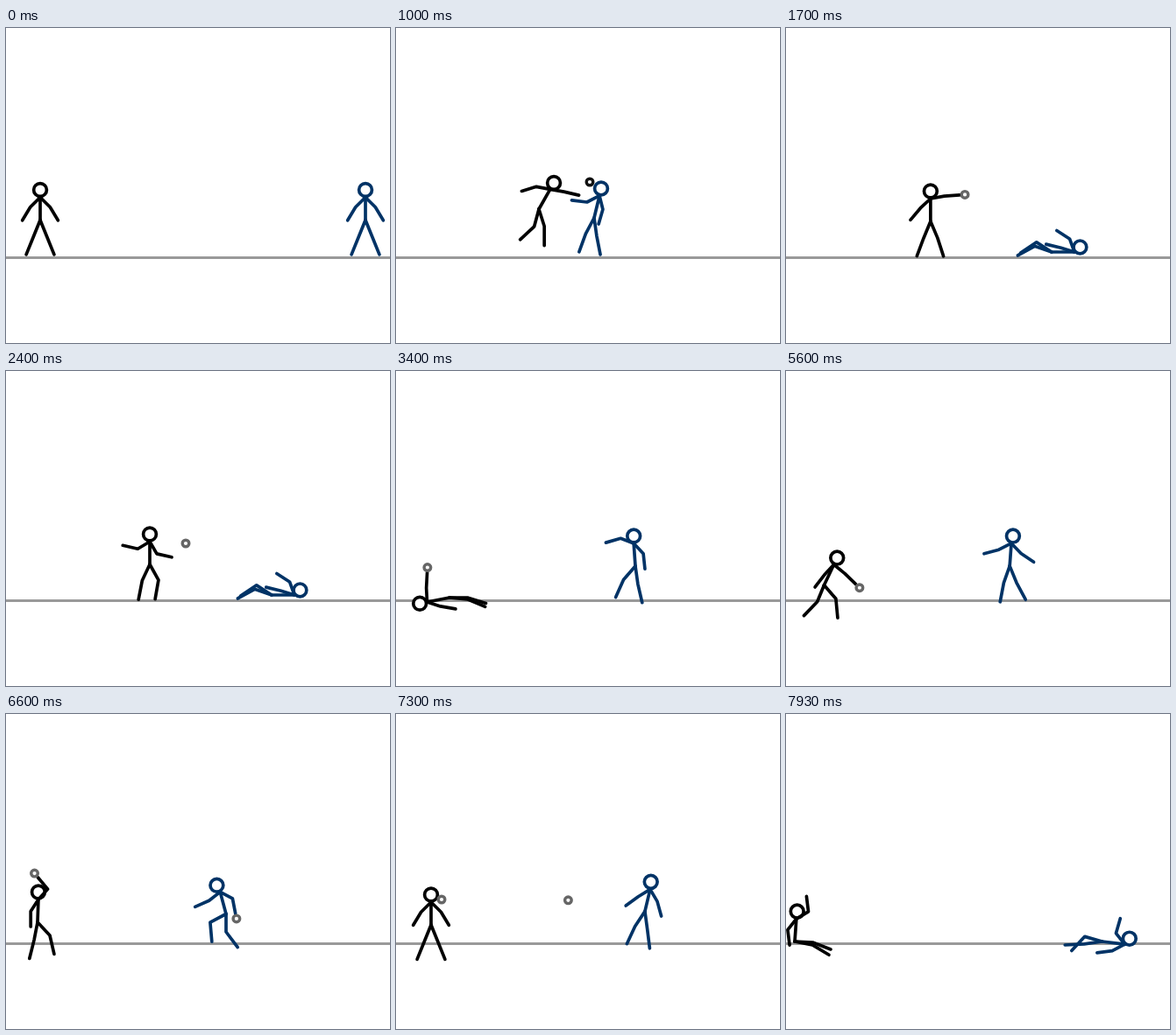
Recreate the animation shown at these times as an HTML page with a canvas. Size 438 by 360 pixels, loop 8 s.

```html
<!DOCTYPE html>
<html lang="en">
<head>
<meta charset="utf-8">
<title>Stick figure ball fight</title>
<style>
html, body { margin: 0; width: 100%; height: 100%; overflow: hidden; background: #fff; }
canvas { display: block; }
</style>
</head>
<body>
<canvas id="stage" width="438" height="360"></canvas>
<script>
const ctx = document.getElementById('stage').getContext('2d');
const LOOP = 8000, LAST = 7930, STEP = 100;
const TORSO = 26, NECK = 8.5, ARM = [16, 17.5], LEG = [20.5, 22], GRIP = 6;

const mix = (a, b, k) => a + (b - a) * k;
const arc = k => Math.sin(Math.PI * k);

// Neighbouring keys around t and the fraction between them
function span(keys, t) {
  let i = 0;
  while (i < keys.length - 2 && t >= keys[i + 1].t) i++;
  const a = keys[i], b = keys[i + 1];
  return [a, b, Math.min(1, Math.max(0, (t - a.t) / (b.t - a.t)))];
}

// Limb angles are in degrees: 0 points down, positive swings right.
// Torso and head lean from upright; each limb is [upper, lower].
function pose(x, y, torso, head, armA, armB, legA, legB) {
  const [a1, a2] = armA, [b1, b2] = armB, [c1, c2] = legA, [d1, d2] = legB;
  return { x, y, torso, head, a1, a2, b1, b2, c1, c2, d1, d2 };
}
const stand = (x, y) => pose(x, y, 0, 0, [-45, -31], [45, 31], [-22, -22], [22, 22]);

// Motions add offsets to a blend of two poses and vanish at both ends
const run = (strides, lean) => k => {
  const cross = (1 - Math.cos(2 * Math.PI * strides * k)) / 2;
  const s = 44 * cross, bend = Math.sign(lean) * 35 * arc(strides * k) ** 2;
  const tilt = lean * arc(k);
  return { torso: tilt, head: tilt, a1: s, a2: s + bend, b1: -s, b2: bend - s,
           c1: s, c2: s - bend, d1: -s, d2: -s - bend };
};
const hop = (height, drift = 0) => k => ({ x: drift * arc(k), y: -height * arc(k) });
const swingA = turn => k => ({ a1: turn * arc(k), a2: turn * arc(k) });
const swingB = turn => k => ({ b1: turn * arc(k), b2: turn * arc(k) });
const bow = k => ({ y: 10 * arc(k), torso: 50 * arc(k), head: 45 * arc(k),
                    c2: -45 * arc(k), d1: 35 * arc(k), d2: -25 * arc(k) });

function move([x, y], angle, length) {
  const r = angle * Math.PI / 180;
  return [x + Math.sin(r) * length, y + Math.cos(r) * length];
}

function limb(start, upper, lower, [l1, l2]) {
  const joint = move(start, upper, l1);
  return [start, joint, move(joint, lower, l2)];
}

function line(points) {
  ctx.beginPath();
  points.forEach(p => ctx.lineTo(...p));
  ctx.stroke();
}

function ring([x, y], r) {
  ctx.beginPath();
  ctx.arc(x, y, r, 0, 7);
  ctx.fill();
  ctx.stroke();
}

class Figure {
  constructor(color) { this.color = color; this.keys = []; }

  // The optional motion acts from this key to the next
  key(t, pose, motion = () => ({})) { this.keys.push({ t, pose, motion }); return this; }

  joints(t) {
    const [a, b, k] = span(this.keys, t);
    const offset = a.motion(k), p = {};
    for (const n in a.pose) p[n] = mix(a.pose[n], b.pose[n], k) + (offset[n] || 0);
    const hip = [p.x, p.y], neck = move(hip, 180 - p.torso, TORSO);
    return {
      hip, neck, head: move(neck, 180 - p.head, NECK),
      armA: limb(neck, p.a1, p.a2, ARM), armB: limb(neck, p.b1, p.b2, ARM),
      legA: limb(hip, p.c1, p.c2, LEG), legB: limb(hip, p.d1, p.d2, LEG),
      gripA: p.a2, gripB: p.b2
    };
  }

  hand(side) {
    return t => {
      const j = this.joints(t);
      return move(j['arm' + side][2], j['grip' + side], GRIP);
    };
  }

  draw(t) {
    const j = this.joints(t);
    ctx.strokeStyle = this.color;
    ctx.lineWidth = 3.7;
    ring(j.head, 7.4);
    [[j.hip, j.neck], j.armA, j.armB, j.legA, j.legB].forEach(line);
  }
}

class Ball {
  constructor() { this.keys = []; }

  // A place is a fixed point or a hand that carries the ball
  key(t, place) { this.keys.push({ t, place }); return this; }

  draw(t) {
    if (t < this.keys[0].t || t > this.keys.at(-1).t) return;
    const [a, b, k] = span(this.keys, t);
    const [p, q] = [a, b].map(({ place }) => typeof place === 'function' ? place(t) : place);
    ctx.strokeStyle = t < 1300 ? '#111' : '#666';
    ctx.lineWidth = 3.4;
    ring([mix(p[0], q[0], k), mix(p[1], q[1], k)], 3.8);
  }
}

const leap = pose(163, 207, 29.5, 30, [-101, -73], [80, 77], [-15, -47], [17.5, 0]);
const thrown = pose(164, 221, 0, 0, [-59, -103], [30, 77], [-25, -11], [29, -10]);
const flat = pose(61, 259, -101, -102, [-177, -183], [72, 80], [90, 73], [85, 67]);
const lob = pose(59, 241, -9, 6, [-33, -66], [76, 114], [-24, -8], [22, 5]);
const aim = pose(36, 238, 2, 0, [-33, 0], [138, 220], [-11, -14], [43, 13]);
const sit = pose(10, 260, 4, 6, [-38, 7], [121, 187], [87, 69], [79, 59]);

const black = new Figure('#000')
  .key(0, stand(39, 219.5), run(2, 14))
  .key(500, stand(106, 219.5), hop(36))
  .key(1000, leap)
  .key(1600, stand(165, 221), swingB(150))
  .key(2400, thrown)
  .key(2700, stand(124, 222))
  .key(3100, stand(88, 226))
  .key(3400, flat)
  .key(3700, flat)
  .key(4100, stand(48, 241), swingB(100))
  .key(4700, lob, bow)
  .key(5800, stand(40, 239))
  .key(6600, aim)
  .key(7000, stand(46, 241))
  .key(7300, stand(40, 241))
  .key(7930, sit);

const hit = pose(226, 217, 13.5, 13, [-63, -97], [14, -16], [-28, -20], [8, 11]);
const down = pose(303, 256, 90, 49, [-160, -123], [-107, -104], [-123, -56], [-109, -61]);
const pitch = pose(273, 223, -4, 0, [-111, -74], [43, 6], [-41, -24], [8, 13]);
const cower = pose(261, 227, 25, 76, [-152, -294], [36, 180], [-6, 45], [23, 58]);
const prowl = pose(251, 228.5, -15, -27, [-52, -66], [62, 11], [-62, 5], [0, 37]);
const beaten = pose(360.5, 260, 97, 40, [-142, -196], [-62, -83], [-106, -43], [-82, -87]);

const blue = new Figure('#036')
  .key(0, stand(410, 219.5), run(3, -14))
  .key(1000, hit, hop(8))
  .key(1700, down)
  .key(2800, down, swingA(-60))
  .key(3400, pitch)
  .key(4300, stand(272, 222), hop(0, 12))
  .key(4700, cower)
  .key(5100, cower)
  .key(5700, stand(254, 222))
  .key(6600, prowl, swingB(-60))
  .key(7200, stand(250, 225), hop(10, 45))
  .key(7930, beaten);

const blackA = black.hand('A'), blackB = black.hand('B');
const blueA = blue.hand('A'), blueB = blue.hand('B');

const balls = [
  new Ball()
    .key(900, blackB).key(1000, [221, 176]).key(1200, [232, 157]).key(1600, blackB)
    .key(2300, blackB).key(2400, [205, 197]).key(2700, [325, 243])
    .key(2800, blueA).key(3100, blueA)
    .key(3300, blackA).key(3700, blackA).key(3900, blackB).key(4200, blackB)
    .key(4400, [268, 197]).key(4700, [196, 256])
    .key(5200, blackB).key(6800, blackB).key(7200, [248, 196]).key(7700, [-10, 280]),
  new Ball()
    .key(5900, blueB).key(7000, blueB).key(7300, [52, 212]).key(7600, [-10, 235])
];

function frame(now) {
  const ms = now % LOOP;
  const t = ms >= LAST ? LAST : Math.floor(ms / STEP) * STEP;
  ctx.fillStyle = '#fff';
  ctx.fillRect(0, 0, 438, 360);
  ctx.lineCap = ctx.lineJoin = 'round';
  ctx.strokeStyle = '#999';
  ctx.lineWidth = 3;
  line([[-5, 262.5], [443, 262.5]]);
  black.draw(t);
  blue.draw(t);
  balls.forEach(ball => ball.draw(t));
  requestAnimationFrame(frame);
}
frame(performance.now());
</script>
</body>
</html>
```
